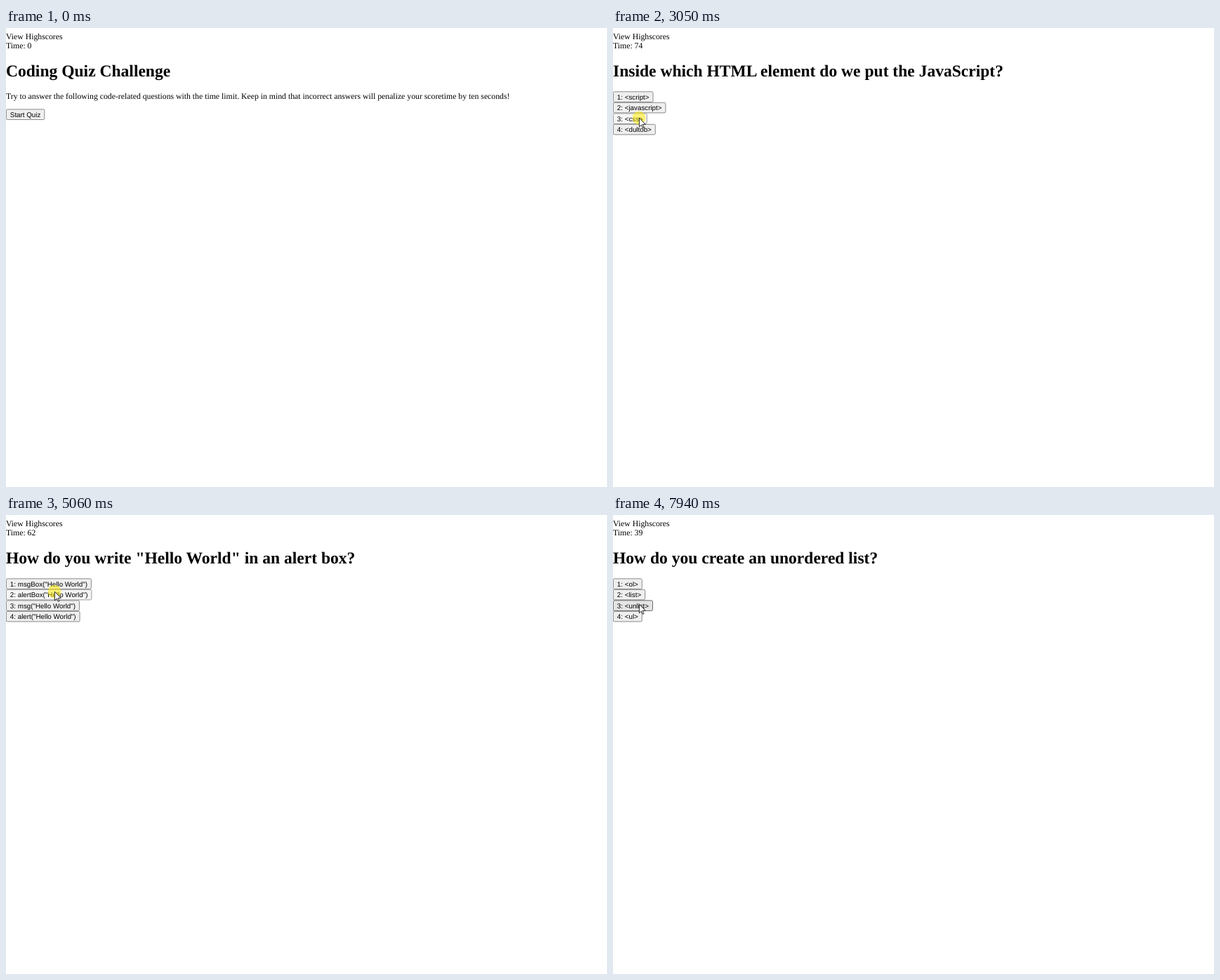
An HTML page that plays this animation: 856x654 px, repeating every 8 s.

```html
<!DOCTYPE html>
<html lang="en">
<head>
<meta charset="utf-8">
<title>Coding Quiz</title>
<style>
  html, body { margin: 0; width: 100%; height: 100%; overflow: hidden; background: #fff; }
  svg { display: block; }
  text { font: 11.75px "Liberation Serif", "Times New Roman", serif; text-rendering: geometricPrecision; }
  .title { font-size: 23.56px; font-weight: bold; }
  .button text { font: 9.79px "Liberation Sans", Arial, sans-serif; }
  .button rect { fill: #efefef; stroke: #767676; stroke-width: .85px; }
  .button.hover rect { fill: #e5e5e5; stroke: #4f4f4f; }
  .button.active rect { fill: #f5f5f5; stroke: #8d8d8d; }
</style>
</head>
<body>
<svg id="stage" width="856" height="654" viewBox="0 0 856 654"></svg>
<script>
const LOOP = 8000, STEP = 66.7, FIRST = 320;
const QUIZ_TIME = 75, PENALTY = 10, SECOND = 990, PRESS = 265, NOTICE = 1000;

const screens = [
  { title: 'Coding Quiz Challenge', top: 123.2, options: ['Start Quiz'],
    intro: 'Try to answer the following code-related questions with the time limit. Keep in mind that incorrect answers will penalize your scoretime by ten seconds!' },
  { title: 'Inside which HTML element do we put the JavaScript?',
    options: ['<script>', '<javascript>', '<css>', '<dultob>'] },
  { title: 'How do you write "Hello World" in an alert box?',
    options: ['msgBox', 'alertBox', 'msg', 'alert'].map(name => name + '("Hello World")') },
  { title: 'Choose the correct HTML element for the largest heading',
    options: ['<head>', '<h3>', '<heading>', '<h1>'] },
  { title: 'How do you create an unordered list?',
    options: ['<ol>', '<list>', '<unlist>', '<ul>'] }
];

// The first click starts the quiz; each later one is a wrong answer.
const clicks = [1180, 3180, 5180, 6250];

// Eased pointer moves: start, duration, destination.
const entry = { x: 709, y: 642 };
const moves = [
  { at: 320, ms: 665, x: 30, y: 122 },
  { at: 1253, ms: 400, x: 128, y: 159.5 },
  { at: 1653, ms: 200, x: 141, y: 200 },
  { at: 1987, ms: 533, x: 298, y: 166 },
  { at: 2520, ms: 467, x: 37, y: 128 },
  { at: 3187, ms: 800, x: 251, y: 288 },
  { at: 4053, ms: 334, x: 87, y: 149 },
  { at: 4387, ms: 400, x: 69, y: 109 },
  { at: 5453, ms: 400, x: 46, y: 97 },
  { at: 7520, ms: 400, x: 37, y: 127 }
];

const stage = document.getElementById('stage');

function add(parent, tag, attrs = {}, content = '') {
  const el = document.createElementNS('http://www.w3.org/2000/svg', tag);
  for (const name in attrs) el.setAttribute(name, attrs[name]);
  el.textContent = content;
  return parent.appendChild(el);
}

function addButton(parent, label, middle) {
  const el = add(parent, 'g', { class: 'button' });
  const box = add(el, 'rect', { x: .4, y: middle - 7.3, height: 14.6, rx: 1.8 });
  const text = add(el, 'text', { x: 5.87, y: middle + 3.4 }, label);
  const width = text.getComputedTextLength() + 11.74;
  box.setAttribute('width', width - .8);
  return { el, middle, width };
}

add(stage, 'text', { x: 0, y: 15.7 }, 'View Highscores');
const timer = add(stage, 'text', { x: 0, y: 29 });

for (const screen of screens) {
  const { title, intro, options, top = 98.1 } = screen;
  screen.el = add(stage, 'g');
  add(screen.el, 'text', { x: 0, y: 68.6, class: 'title' }, title);
  if (intro) add(screen.el, 'text', { x: 0, y: 101 }, intro);
  screen.buttons = options.map((option, i) =>
    addButton(screen.el, intro ? option : `${i + 1}: ${option}`, top + i * 15.5));
}

const wrong = add(stage, 'g');
add(wrong, 'rect', { x: 0, y: 158, width: 856, height: 1, fill: '#9a9a9a' });
add(wrong, 'rect', { x: 0, y: 159, width: 856, height: .6, fill: '#eee' });
add(wrong, 'text', { x: 0, y: 176 }, 'Wrong...');

const pointer = add(stage, 'g');
const glow = add(pointer, 'circle', { r: 9.5, fill: '#ffee00', 'fill-opacity': .52 });
add(pointer, 'path', {
  d: 'M0 0V17L4 13.3L6.6 19L9 18L6.4 12.3H12Z', transform: 'translate(.4 .2) scale(.74)',
  fill: '#fff', stroke: '#000', 'stroke-width': 1.1
});

const show = (el, on) => el.setAttribute('display', on ? 'inline' : 'none');
const ease = u => u * u * (3 - 2 * u);

function pointerAt(t) {
  const done = moves.filter(m => t >= m.at).length;
  if (!done) return null;
  const to = moves[done - 1], from = moves[done - 2] || entry;
  const k = ease(Math.min(1, (t - to.at) / to.ms));
  return { x: from.x + (to.x - from.x) * k, y: from.y + (to.y - from.y) * k };
}

function secondsLeft(t, answered) {
  if (!answered) return 0;
  const ticks = Math.max(0, Math.floor((t - clicks[0]) / SECOND));
  return QUIZ_TIME - ticks - PENALTY * (answered - 1);
}

function draw(t) {
  const answered = clicks.filter(c => t >= c).length;
  const current = screens[answered];
  for (const s of screens) show(s.el, s === current);
  timer.textContent = 'Time: ' + secondsLeft(t, answered);
  show(wrong, answered > 1 && t < clicks[answered - 1] + NOTICE);

  const pressed = t >= clicks[answered] - PRESS;
  const tip = pointerAt(t);
  show(pointer, tip);
  show(glow, pressed);
  if (tip) pointer.setAttribute('transform', `translate(${tip.x} ${tip.y})`);

  // Hover trails the pointer by one step.
  const over = pointerAt(t - STEP);
  for (const b of current.buttons) {
    const hover = over && over.x < b.width && Math.abs(over.y - b.middle) < 7.75;
    b.el.setAttribute('class', 'button' + (hover ? (pressed ? ' active' : ' hover') : ''));
  }
}

// The picture advances in even steps; the small lead absorbs rounding.
const snap = t => FIRST + Math.floor((t + 8 - FIRST) / STEP) * STEP;

const start = performance.now();
function tick() {
  draw(snap((performance.now() - start) % LOOP));
  requestAnimationFrame(tick);
}
tick();
</script>
</body>
</html>
```
